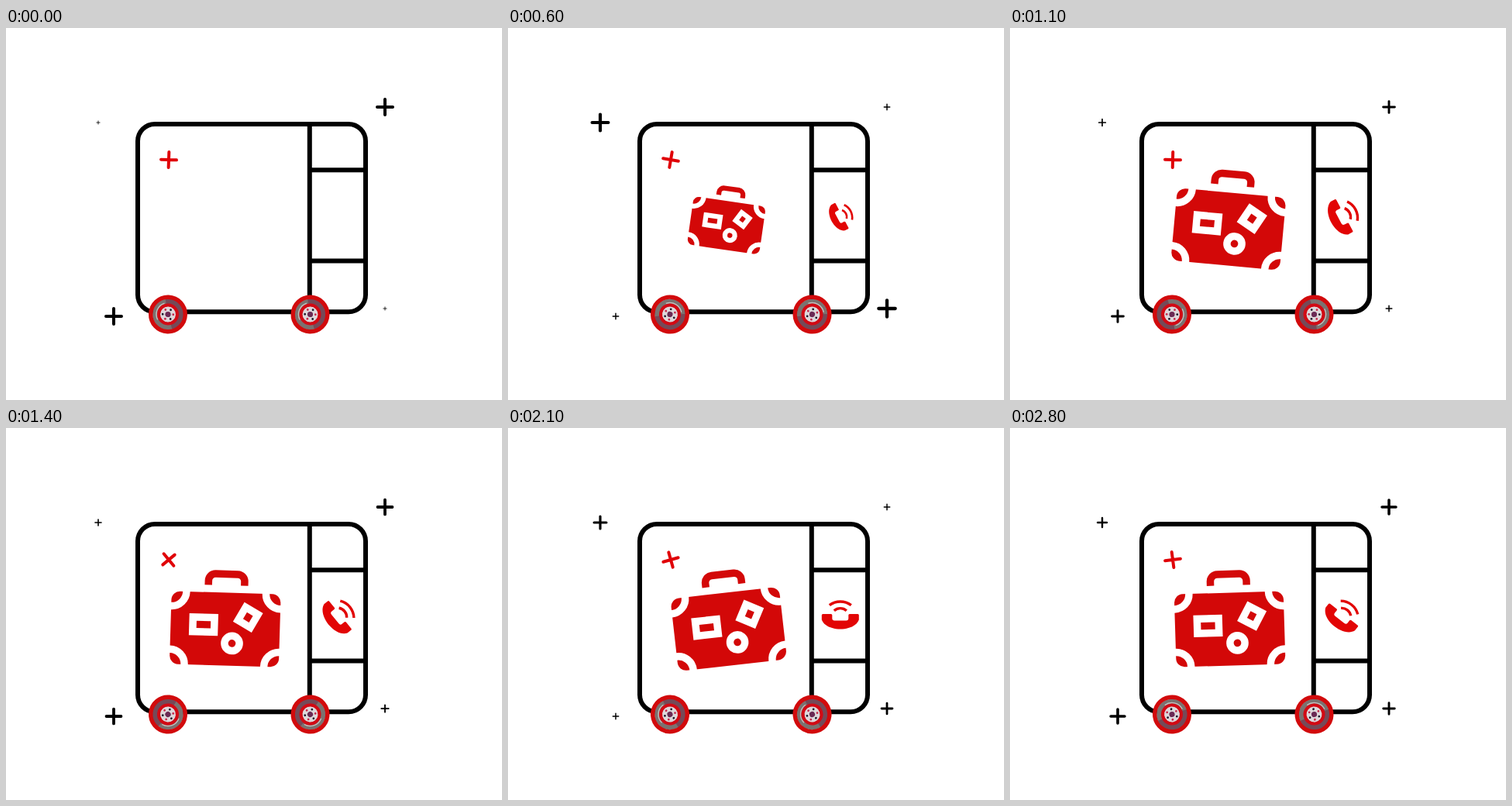
Write an HTML page that moves like this. It is 640 by 480 pixels and loops after 2.9 s.

```html
<!DOCTYPE html>
<html lang="en">
<head>
<meta charset="utf-8">
<title>Travel van</title>
<style>
  html, body { margin: 0; width: 100%; height: 100%; overflow: hidden; background: #fff; }
  svg { display: block; width: 640px; height: 480px; }
</style>
</head>
<body>
<svg viewBox="0 0 640 480" fill="none">
  <defs>
    <path id="plus" d="M-10 0H10M0-10V10" stroke-width="4" stroke-linecap="round"/>
    <g id="wheel">
      <circle r="20" fill="#7b7270"/>
      <path d="M-4-19.6A20 20 0 1 1 6 19L0 0Z" fill="#754a58"/>
      <path d="M-13 7.5A15 15 0 0 1-5-14.1" stroke="#c4bfbd" stroke-width="1.4"/>
      <circle r="22.3" stroke="#d20a0c" stroke-width="5.4"/>
      <circle r="10.5" fill="#dfd8db"/>
      <circle r="12" stroke="#d20a14" stroke-width="4"/>
      <g id="bolts"></g>
      <circle r="3.6" fill="#6b2a54"/>
    </g>
  </defs>

  <g stroke="#000" stroke-width="6">
    <rect x="170" y="124" width="294" height="242.3" rx="22"/>
    <path d="M391.8 124V366M392 183.2H464M392 300.5H464"/>
  </g>

  <g id="case" fill="#d30808">
    <path d="M-23.3-42.5V-48a9 9 0 0 1 9-9H14.3a9 9 0 0 1 9 9V-42.5" fill="none" stroke="#d30808" stroke-width="9.5"/>
    <rect x="-70.5" y="-33" width="141" height="94" rx="11"/>
    <g id="stickers" fill="none" stroke="#fff" stroke-width="9.5">
      <circle cx="9.3" cy="32.2" r="9.6"/>
      <rect x="-41.9" y="-.4" width="27.8" height="18.8"/>
      <rect x="-9.2" y="-9.7" width="18.4" height="19.4" transform="translate(29 -2) rotate(29)"/>
    </g>
  </g>

  <g id="phone">
    <path fill="#e20505" d="M-24-1.7q0-1.5 1.5-1.5H-12q1.5 0 1.5 1.5V2.3q0 3 3 3H7.5q3 0 3-3V-1.7q0-1.5 1.5-1.5H22.5q1.5 0 1.5 1.5V4.3C18 20.3-18 20.3-24 4.3Z"/>
    <path stroke="#e20505" stroke-width="3.4" d="M-14-14.5A23 23 0 0 1 14-14.5M-8-7.5A12 12 0 0 1 8-7.5"/>
  </g>

  <use id="spin" href="#plus" stroke="#e00308"/>
  <g id="sparks" stroke="#000"></g>
  <use id="rear" href="#wheel"/>
  <use id="front" href="#wheel"/>
</svg>
<script>
const STEP = 100, LOOP = 2900;
const { abs, min, max, floor, cos, sin, PI } = Math;
const $ = id => document.getElementById(id);

function add(parent, tag, attrs) {
  const node = document.createElementNS('http://www.w3.org/2000/svg', tag);
  for (const name in attrs) node.setAttribute(name, attrs[name]);
  return $(parent).appendChild(node);
}

function place(node, x, y, angle, scale = 1) {
  node.setAttribute('transform', `translate(${x} ${y}) rotate(${angle}) scale(${scale})`);
}

const smooth = x => x * x * (3 - 2 * x);
// Triangle wave: 0 at the start of each period, 1 halfway
const triangle = (n, period) => 1 - abs(1 - 2 * (n % period) / period);

for (let i = 0; i < 6; i++) {
  const a = i * PI / 3;
  add('bolts', 'circle', {
    cx: 6.8 * cos(a), cy: 6.8 * sin(a), r: 1.4,
    fill: i % 2 ? '#1d1a2b' : '#c22a4c'
  });
}
for (const cx of [-70.5, 70.5])
  for (const cy of [-33, 61]) add('stickers', 'circle', { cx, cy, r: 19.2 });

// Each spark pulses between two sizes in pixels
const sparks = [
  { x: 119, y: 122, from: 5, to: 26, period: 12.6 },
  { x: 489, y: 362, from: 5, to: 26, period: 12.2 },
  { x: 489, y: 102, from: 24, to: 7, period: 13.5 },
  { x: 139, y: 372, from: 24, to: 7, period: 13.5 }
];
for (const s of sparks) s.node = add('sparks', 'use', { href: '#plus' });

function draw(time) {
  let n = floor(time % LOOP / STEP);
  if (n === 12) n = 11; // the motion rests for one step

  const angle = 2 + 16.3 * min(n, 21) + 14 * max(0, n - 21); // slows near the end
  place($('rear'), 209, 369.5, angle);
  place($('front'), 392.5, 369.5, angle);
  place($('spin'), 210, 170, angle);

  // Both icons grow, then swing to a turning point and back
  const caseTilt = min(8.2, 1.17 * abs(n - 22.5) - 8.2);
  const phoneTilt = min(62, 7.3 * max(0, abs(n - 21.9) - 0.9));
  place($('case'), 283.2, 245.5, caseTilt, min(1, n / 9));
  place($('phone'), 428.8, 243.2, phoneTilt, smooth(min(1, n / 8.6)));

  for (const s of sparks) {
    const size = s.from + (s.to - s.from) * triangle(n, s.period);
    place(s.node, s.x, s.y, 0, size / 24);
  }
}

let start;
function tick(now) {
  start ??= now;
  draw(now - start);
  requestAnimationFrame(tick);
}
draw(0);
requestAnimationFrame(tick);
</script>
</body>
</html>
```
